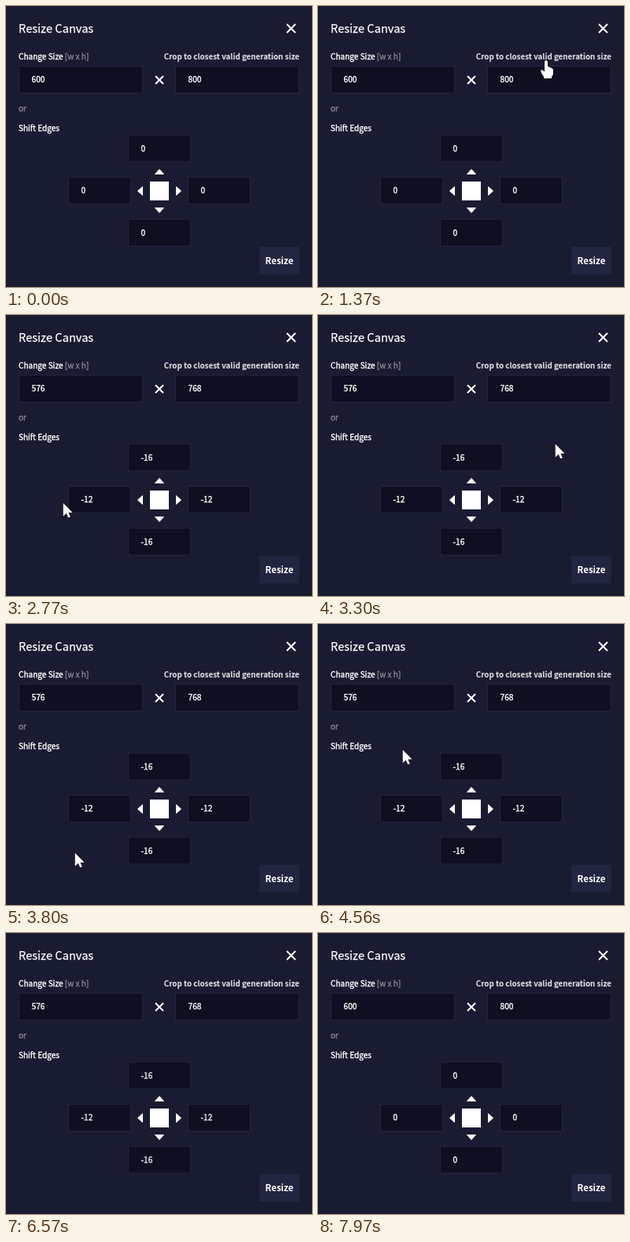
An HTML page for the animation above (8 s loop, 389 by 357 pixels).

```html
<!DOCTYPE html>
<html lang="en">
<head>
<meta charset="utf-8">
<title>Resize Canvas</title>
<style>
  html, body { margin: 0; width: 100%; height: 100%; overflow: hidden; background: #191b31; }
  svg { display: block; width: 389px; height: 357px; }
  text {
    font: 10.05px "Noto Sans CJK JP", "Noto Sans CJK SC", "Noto Sans CJK", "Noto Sans", sans-serif;
    fill: #fff; stroke: #fff; stroke-width: .35;
  }
  .title { font-size: 14.65px; stroke-width: .25; }
  .number { font-size: 10.2px; }
  .crop { font-size: 9.8px; font-weight: 700; text-anchor: end; fill: #d9d9de; stroke: #d9d9de; stroke-width: .15; }
  .dim { fill: #85868f; stroke: #85868f; }
  .button { font-size: 11.5px; font-weight: 700; text-anchor: middle; stroke: none; }
  .field { fill: #0e0f21; stroke: #22253f; }
  .icon { fill: none; stroke: #fff; stroke-width: 2; }
  .arrows path { fill: #fff; stroke: #fff; stroke-linejoin: round; }
  #pointer path { fill: #fff; stroke: #000; paint-order: stroke; stroke-linejoin: round; }
</style>
</head>
<body>
<svg viewBox="0 0 389 357">
  <rect width="389" height="357" fill="#191b31"/>
  <text class="title" x="16" y="34">Resize Canvas</text>
  <path class="icon" d="M357 23l11 11m0-11l-11 11"/>
  <text x="16" y="68">Change Size <tspan class="dim">[w x h]</tspan></text>
  <text class="crop" x="373" y="68">Crop to closest valid generation size</text>
  <path class="icon" d="M190 89l10 10m0-10l-10 10"/>
  <text class="dim" x="16" y="134">or</text>
  <text x="16" y="159">Shift Edges</text>
  <rect x="183" y="223" width="24" height="24" fill="#fff"/>
  <g class="arrows" id="arrows"></g>
  <rect x="322" y="306" width="51" height="35" fill="#22253f"/>
  <text class="button" x="347.5" y="328">Resize</text>
  <g id="cropped"></g>
  <g id="initial"></g>
  <g id="pointer">
    <path id="arrow" d="M-.3-.3V16.8L3.8 13L6.2 18.5L8.8 17.4L6.5 12H11.7Z"/>
    <path id="hand" d="M-2 1Q-2-1 0-1Q2-1 2 1V7Q4 6.5 4.6 8Q6.4 7.6 7 9.2Q9 9 9 11V15.5Q9 18 7 20V22H-3V20L-6.3 14.5Q-7.5 11.5-5.5 11Q-4 11-2 13.5Z"/>
  </g>
</svg>
<script>
const LOOP = 8000;
const CROP_AT = 1700;
const FADE = { start: 6570, step: 100, count: 15 };
const CENTRE = [195, 235];
const SIDES = [[0, -1], [-1, 0], [1, 0], [0, 1]];
const SIZE = [600, 800];
const GRID = 64;

const get = id => document.getElementById(id);
const mix = (a, b, u) => a + (b - a) * u;
const mixPoint = (a, b, u) => a.map((v, i) => mix(v, b[i], u));
const smooth = u => u * u * (3 - 2 * u);

get('arrows').innerHTML = [0, 90, 180, 270].map(angle =>
  `<path transform="translate(${CENTRE}) rotate(${angle})" d="M-5.5-21.5h11l-5.5-6z"/>`).join('');

const field = (x, y, width, value) =>
  `<rect class="field" x="${x}" y="${y}" width="${width}" height="34"/>` +
  `<text class="number" x="${x + 16}" y="${y + 20.8}">${value}</text>`;

function fillFields(id, size) {
  const shift = size.map((v, i) => (v - SIZE[i]) / 2);
  get(id).innerHTML =
    size.map((v, i) => field(16.5 + 199 * i, 76.5, 157, v)).join('') +
    SIDES.map(([dx, dy]) => field(155.5 + 76 * dx, 217.5 + 53.5 * dy, 79, shift[dx ? 0 : 1])).join('');
}
fillFields('cropped', SIZE.map(v => v - v % GRID));
fillFields('initial', SIZE);

const LINK = [290, 70];
const REST = [342, 257];
// Wandering centre of the circling pointer: [time, x, y]
const drift = [[2770, 183, 229], [3800, 192, 219], [4560, 212, 232], [5130, 193, 222], [5260, 195, 265]];

function circle(t) {
  const s = (t - drift[0][0]) / 1000;
  const angle = .09 + 7.1 * s - .32 * s * s;
  const radius = Math.min(147, 110 + 60 * s);
  const next = drift.findIndex(key => t < key[0]);
  const a = drift[next - 1], b = drift[next];
  const [, x, y] = mixPoint(a, b, smooth((t - a[0]) / (b[0] - a[0])));
  return [x - radius * Math.cos(angle), y + 101 * Math.sin(angle)];
}

// Arc from the link out to the left side of the circle
function leave(u) {
  const angle = u ** 1.5 * Math.PI / 2;
  return [LINK[0] - 217 * Math.sin(angle), LINK[1] + 168 * (1 - Math.cos(angle))];
}

function pointerAt(t) {
  if (t < 690 || t >= 5740) return null;
  if (t < 1370) return mixPoint(LINK, [386, 133], (1 - (t - 690) / 680) ** 2);
  if (t < 2200) return LINK;
  if (t < 2770) return leave((t - 2200) / 570);
  if (t < 5260) return circle(t);
  return mixPoint(REST, [390, 243], Math.max(0, (t - 5540) / 200) ** 2);
}

function initialOpacity(t) {
  if (t < CROP_AT) return 1;
  const steps = Math.floor((t - FADE.start) / FADE.step) + 1;
  return Math.min(1, Math.max(0, steps / FADE.count));
}

function draw(t) {
  get('initial').style.opacity = initialOpacity(t);
  const point = pointerAt(t);
  get('pointer').style.display = point ? '' : 'none';
  if (!point) return;
  const [x, y] = point.map(Math.round);
  const overLink = x > 201 && x < 373 && y < 73;
  get('pointer').setAttribute('transform', `translate(${x} ${y})`);
  get('arrow').style.display = overLink ? 'none' : '';
  get('hand').style.display = overLink ? '' : 'none';
}

const start = performance.now();
function tick() {
  draw((performance.now() - start) % LOOP);
  requestAnimationFrame(tick);
}
tick();
</script>
</body>
</html>
```
